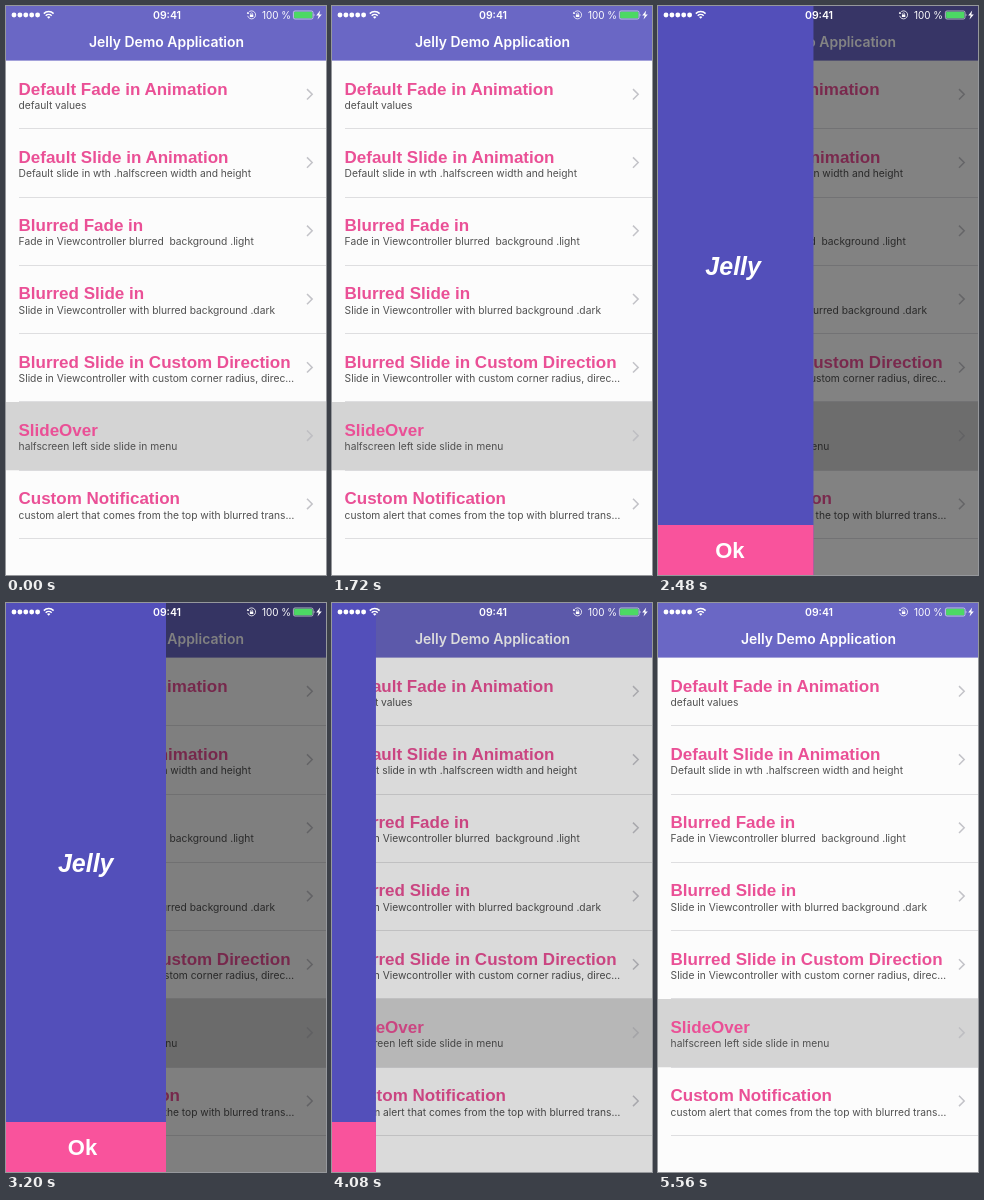
Animation, 320 px wide and 569 px high, one loop 5.96 s. Source, as an HTML page:

```html
<!DOCTYPE html>
<html lang="en">
<head>
<meta charset="utf-8">
<title>Slide-over menu</title>
<style>
  html, body { margin: 0; width: 100%; height: 100%; overflow: hidden; background: #fcfcfc; }
  svg { display: block; width: 100%; height: 100%; }
  text { white-space: pre; }
  .ui { font-family: Inter, "Open Sans", sans-serif; fill: #fff; }
  .bold { font-family: "Liberation Sans", Arial, sans-serif; font-weight: 700; }
  .title { font-size: 17px; fill: #ea5096; }
  .detail { font-size: 10.24px; fill: #505050; }
  .chevron { fill: none; stroke: #c3c3c8; stroke-width: 1.5; }
  .selected .chevron { stroke: #bebec2; }
</style>
</head>
<body>
<svg viewBox="0 0 320 569" preserveAspectRatio="none">
  <rect width="320" height="569" fill="#fcfcfc"/>
  <g id="list"></g>
  <rect width="320" height="54.6" fill="#6a67c5"/>
  <text class="ui" x="160.5" y="41" font-size="13.95" font-weight="600" text-anchor="middle">Jelly Demo Application</text>

  <rect id="dim" width="320" height="569" opacity="0"/>

  <g id="panel" transform="translate(-160)">
    <rect width="160" height="569" fill="#534fba"/>
    <rect y="519" width="160" height="50" fill="#f9539c"/>
    <text class="bold" x="79.7" y="269" font-size="25" font-style="italic" fill="#fff" text-anchor="middle">Jelly</text>
    <text class="bold" x="61.8" y="552" font-size="22" fill="#fff">Ok</text>
  </g>

  <g id="status" fill="#fff">
    <g id="signal"></g>
    <g fill="none" stroke="#fff" stroke-width="1.5">
      <path d="M37.8 7.6a7 7 0 0 1 9.8 0"/>
      <path d="M39.7 9.7a4.3 4.3 0 0 1 6 0"/>
    </g>
    <path d="M41 11a2.5 2.5 0 0 1 3.4 0l-1.7 1.8z"/>
    <text class="ui" x="161" y="12.7" font-size="10.5" font-weight="600" text-anchor="middle">09:41</text>
    <path d="M242.3 6.6a4 4 0 1 1-.6 3.2" fill="none" stroke="#fff" stroke-width=".8"/>
    <path d="M240.8 7.8l2.6.2-1.8-2.2z"/>
    <rect x="243.9" y="8.5" width="3.4" height="2.5"/>
    <path d="M244.6 8.6v-.8a1 1 0 0 1 2 0v.8" fill="none" stroke="#fff" stroke-width=".6"/>
    <text class="ui" x="256" y="12.7" font-size="9.9">100 %</text>
    <rect x="287.4" y="5" width="19.6" height="8" rx="1.6" fill="none" stroke="#fff" stroke-width=".6"/>
    <rect x="288.1" y="5.7" width="18.2" height="6.6" rx=".8" fill="#4cd964"/>
    <path d="M307.8 7.4q1.4 1.6 0 3.2z"/>
    <path d="M314.2 4.6l-4 5h2.5l-1.2 4 4.3-5.2h-2.5z"/>
  </g>
</svg>
<script>
const LOOP = 5960, STEP = 40;
const OPEN_AT = 1987, CLOSE_AT = 3847;
const STIFFNESS = 0.011;
const PANEL_WIDTH = 160, MAX_DIM = 0.5;
const NAV_HEIGHT = 54.6, ROW_HEIGHT = 68.27, SELECTED = 5;

const rows = [
  ['Default Fade in Animation', 'default values'],
  ['Default Slide in Animation', 'Default slide in wth .halfscreen width and height'],
  ['Blurred Fade in', 'Fade in Viewcontroller blurred  background .light'],
  ['Blurred Slide in', 'Slide in Viewcontroller with blurred background .dark'],
  ['Blurred Slide in Custom Direction', 'Slide in Viewcontroller with custom corner radius, direc…'],
  ['SlideOver', 'halfscreen left side slide in menu'],
  ['Custom Notification', 'custom alert that comes from the top with blurred trans…']
];

const byId = id => document.getElementById(id);

function add(parent, tag, attrs, text = '') {
  const node = document.createElementNS('http://www.w3.org/2000/svg', tag);
  for (const key in attrs) node.setAttribute(key, attrs[key]);
  node.textContent = text;
  return parent.appendChild(node);
}

rows.forEach(([title, detail], i) => {
  const top = NAV_HEIGHT + i * ROW_HEIGHT;
  const middle = top + 33.7;
  const selected = i === SELECTED;
  const row = add(byId('list'), 'g', { class: selected ? 'selected' : '' });
  add(row, 'rect', { x: 13, y: Math.floor(top + ROW_HEIGHT), width: 307, height: 1, fill: '#dedee0' });
  if (selected) add(row, 'rect', { y: Math.round(top), width: 320, height: ROW_HEIGHT, fill: '#d4d4d4' });
  add(row, 'text', { class: 'bold title', x: 12.5, y: top + 34.05 }, title);
  add(row, 'text', { class: 'ui detail', x: 12.6, y: top + 48.3 }, detail);
  add(row, 'path', { class: 'chevron', d: `M301 ${middle - 5.2}l5.2 5.2-5.2 5.2` });
});

for (let i = 0; i < 5; i++) add(byId('signal'), 'circle', { cx: 8 + i * 5.9, cy: 9, r: 2.45 });

// Critically damped spring from 0 to 1.
function spring(elapsed) {
  const x = Math.max(0, elapsed) * STIFFNESS;
  return 1 - (1 + x) * Math.exp(-x);
}

const start = performance.now();

function draw() {
  const elapsed = (performance.now() - start) % LOOP;
  const time = Math.floor(elapsed / STEP) * STEP;
  const shown = Math.max(0, spring(time - OPEN_AT) - spring(time - CLOSE_AT));
  byId('panel').setAttribute('transform', `translate(${PANEL_WIDTH * (shown - 1)})`);
  byId('dim').setAttribute('opacity', MAX_DIM * shown);
  requestAnimationFrame(draw);
}
draw();
</script>
</body>
</html>
```
